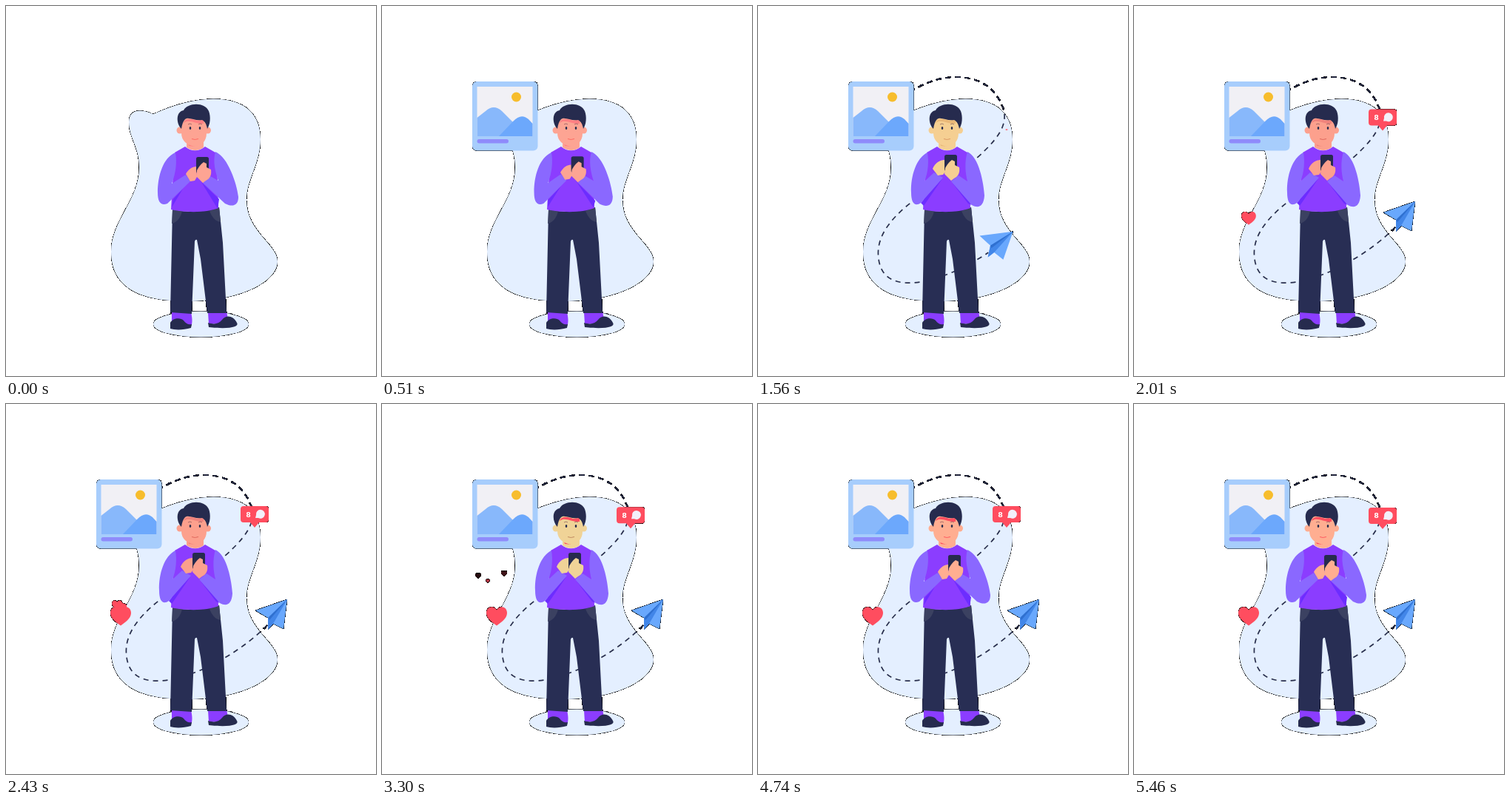
Recreate the animation shown at these times as an HTML page. Size 500 px wide and 500 px high, loop 5490 ms.

```html
<!DOCTYPE html>
<html lang="en">
<head>
<meta charset="utf-8">
<title>Sharing a picture</title>
<style>
  html, body { margin: 0; width: 100%; height: 100%; overflow: hidden; background: #fff; }
  svg { display: block; width: 100vw; height: 100vh; }
  text { font: bold 9.5px "DejaVu Sans", "Open Sans", sans-serif; }
  .skin { fill: var(--skin); }
  .shade { fill: var(--shade); }
</style>
</head>
<body>
<svg viewBox="0 0 500 500">
  <defs>
    <!-- Hard dark rim under every soft outer edge -->
    <filter id="rim" filterUnits="userSpaceOnUse" x="0" y="0" width="500" height="500" color-interpolation-filters="sRGB">
      <feComponentTransfer in="SourceAlpha" result="edge"><feFuncA type="linear" slope="255"/></feComponentTransfer>
      <feMerge><feMergeNode in="edge"/><feMergeNode in="SourceGraphic"/></feMerge>
    </filter>
    <path id="heart" d="M0 13 C-5 9-14 4-14-4 C-14-13-4-15 0-8 C4-15 14-13 14-4 C14 4 5 9 0 13Z" fill="#ff4d5f"/>
    <mask id="reveal" maskUnits="userSpaceOnUse" x="0" y="0" width="500" height="500">
      <path id="trace" fill="none" stroke="#fff" stroke-width="8"/>
    </mask>
  </defs>

  <g filter="url(#rim)">
    <g fill="#e4efff">
      <path d="M199 146 C225 134 255 125.500 280 125.500 C325 125.500 344 148 344 180 C344 212 325 235 325 262 C325 305 367 322 367 345 C367 372 318 399 244 399 C180 399 142 380 142 332 C142 290 180 262 180 218 C180 190 166 178 166 157 C166 142 178 137 199 146Z"/>
      <ellipse cx="263.500" cy="430" rx="64.500" ry="17.500"/>
    </g>

    <g mask="url(#reveal)">
      <path id="route" d="M209 114 C252 87 300 92 320 118 C345 150 333 172 295 206 C270 228 240 240 210 263 C175 290 159 315 163 342 C167 372 192 377 220 373 C270 364 325 328 353 299" fill="none" stroke="#282e4c" stroke-width="1.700" stroke-dasharray="7 6" stroke-dashoffset="4"/>
    </g>

    <g id="picture">
      <rect x="122" y="102" width="88.500" height="93.500" rx="6" fill="#a7cdfc"/>
      <path d="M128.500 109H203.500V176H128.500Z" fill="#f1f0f5"/>
      <circle cx="181.500" cy="123" r="6.500" fill="var(--sun)"/>
      <path d="M128.500 151 L140 142 Q151 132 162 142 L185 165 L190 176 H128.500Z" fill="#88b8fb"/>
      <path d="M158 176 L177 156 Q188 144 198 153 L203.500 159 V176Z" fill="#6ca8fc"/>
      <rect x="128.500" y="180" width="42.500" height="5.500" rx="2.700" fill="#8f8bfb"/>
    </g>

    <g id="man">
      <path d="M224 413 L250 414 C252 422 252 429 250 433 L224 431Z M273 414 L298 413 L301 428 L274 430Z" fill="#8b3dff"/>
      <path d="M222 428 C226 421 236 421 240 425 C243 429 246 431 251 430 L250 435 C240 438 228 438 222 436Z M273 428 C282 431 288 429 292 424 C297 417 307 418 312 428 C316 434 300 437 274 434Z" fill="#262b4e"/>
      <path d="M225 275 C240 279 270 279 288 272 L293 320 L298 415 L272 415 L263 342 L258 316 Q256 315 255 318 L251 416 L222 414Z" fill="#282e54"/>
      <path d="M225 275 L238 277 C236 287 230 293 224 294Z M275 277 L288 272 L290 292 C282 291 278 284 275 277Z" fill="#3b4161"/>

      <path class="skin" d="M244 180 H267 V191 Q256 199 244 191Z"/>
      <path class="shade" d="M245 183 Q250 190 256 190 L247 189Z"/>
      <path d="M242 190 C250 197 261 197 269 190 L283 198 L286 235 L287 273 C270 280 240 279 223 275 L225 240 L228 198Z" fill="#8b3dff"/>
      <path id="folds" fill="#6c2dff"/>
      <path id="leftArm" fill="#8a68ff"/>
      <path id="rightArm" fill="#8a68ff"/>
      <path id="leftHand" class="skin"/>
      <g id="hold">
        <rect x="257" y="204" width="17" height="22" rx="2.500" fill="#262b4e"/>
        <path class="skin" d="M258 222 C260 218 264 213 267 211 L271 213 L271 218 L277 221 C278 228 276 233 270 236 L266 239 L257 230Z"/>
      </g>

      <circle class="skin" cx="235" cy="168" r="4.500"/>
      <circle class="skin" cx="272.500" cy="168" r="4.500"/>
      <path class="skin" d="M237 150 H271 V172 C271 183 264 189 255 189 C245 189 237 182 237 172Z"/>
      <path class="shade" d="M240 158 C242 151 251 152 258 155 L267 154 V159 C256 160 248 152 240 158Z"/>
      <path d="M237 166 C230 159 229 143 240 141 C245 131 268 129 274 142 C277 150 276 160 272 166 C271 160 269 156 265 154 C256 156 247 149 242 153 C239 156 238 160 237 166Z" fill="#262b4e"/>
      <g fill="#262b4e">
        <ellipse cx="249" cy="165" rx="1.300" ry="2"/>
        <ellipse cx="262" cy="165" rx="1.300" ry="2"/>
      </g>
      <path d="M246 160 Q249 158 251 160 M260 160 Q262 158 265 160" fill="none" stroke="#6b4650" stroke-width=".6"/>
      <path d="M251 179.500 Q255 181.500 260 179.500" fill="none" stroke="var(--mouth)"/>
    </g>

    <g id="plane">
      <path d="M27 -35 L-16 -20 L1 -10 L1 6 L8 -2 L22 5Z" fill="#69a8fd"/>
      <path d="M27 -35 L1 -10 L1 6 L8 -2Z" fill="#4286e8"/>
      <path d="M27 -35 L1 -10 L3 -7Z" fill="#2f70d0"/>
    </g>

    <g id="bubble">
      <path d="M-15 -29 H15 Q19 -29 19 -25 V-11 Q19 -7 15 -7 H6 L0 0 L-6 -7 H-15 Q-19 -7 -19 -11 V-25 Q-19 -29 -15 -29Z" fill="#ff4d5f"/>
      <text x="-8.500" y="-14.500" text-anchor="middle" fill="#fff">8</text>
      <path d="M1 -13 L2 -17 A6 6 0 1 1 5 -13Z" fill="#f3f0fa"/>
    </g>

    <g id="sparks"></g>
    <use id="like" href="#heart"/>
  </g>
</svg>

<script>
const LOOP = 5490, STEP = 30;
const el = id => document.getElementById(id);
const set = (node, attr, value) => node.setAttribute(attr, value);
const span = (t, from, to) => Math.min(1, Math.max(0, (t - from) / (to - from)));
const smooth = p => (1 - Math.cos(Math.PI * p)) / 2;
const easeOut = p => 1 - (1 - p) ** 3;
const mix = (a, b, k) => a + (b - a) * k;

const route = el('route'), trace = el('trace');
const routeLength = route.getTotalLength();
set(trace, 'd', route.getAttribute('d'));
set(trace, 'stroke-dasharray', `${routeLength} ${routeLength + 20}`);

// Each part has two poses with the same path structure.
const poses = {
  leftArm: [
    'M229 198 C212 205 205 230 205 252 C205 266 210 270 218 267 L249 237 L243 228 L224 240 C230 225 231 210 229 198Z',
    'M229 198 C214 205 206 230 207 252 C207 268 213 271 220 266 L250 232 L238 225 L225 237 C230 225 231 210 229 198Z'],
  rightArm: [
    'M283 197 C300 204 312 240 314 258 C314 270 306 272 296 267 L266 239 L276 230 L287 236 C283 225 279 210 283 197Z',
    'M283 197 C299 204 305 240 306 256 C305 271 298 274 289 269 L261 237 L271 229 L283 237 C280 225 279 210 283 197Z'],
  leftHand: [
    'M243 227 C246 221 252 217 257 217 L258 231 L255 236 L249 237Z',
    'M236 220 C239 212 246 208 252 208 L253 224 L250 228 L243 229Z'],
  folds: [
    'M224 272 L226 261 L239 247Z M264 238 L288 261 L286 274Z',
    'M224 270 L220 266 L250 232Z M261 237 L289 269 L284 267Z']
};
const blend = ([a, b], k) => {
  const target = b.match(/\d+/g);
  let i = 0;
  return a.replace(/\d+/g, n => mix(+n, +target[i++], k).toFixed(2));
};

// Start time, skin, shade, mouth, sun
const tones = [
  [0, '#fda493', '#ff7f83', '#ff6b62', '#f7bd2d'],
  [570, '#9ba3b0', '#7f8797', '#51597a', '#b7c2d0'],
  [1200, '#f5cf92', '#e9b878', '#dc9a66', '#f7bd2d'],
  [2000, '#fca08d', '#f0837c', '#e0685c', '#f7bd2d'],
  [2880, '#f0d397', '#ff4d5f', '#c08a60', '#f7bd2d'],
  [3720, '#ffae91', '#ff4d5f', '#ff5a60', '#f7bd2d']
];
const toneNames = ['--skin', '--shade', '--mouth', '--sun'];

// End x, end y, end scale, end opacity
const sparks = [[130, 232, .28, .15], [143, 239, .18, .7], [165, 229, .28, .25]].map(end => {
  const node = document.createElementNS('http://www.w3.org/2000/svg', 'use');
  set(node, 'href', '#heart');
  el('sparks').append(node);
  return { node, end };
});

function place(id, x, y, scale, angle = 0) {
  const node = el(id);
  set(node, 'transform', `translate(${x} ${y}) rotate(${angle}) scale(${scale})`);
  set(node, 'visibility', scale > 0 ? 'visible' : 'hidden');
}

function headingAt(distance) {
  const a = route.getPointAtLength(Math.max(0, distance - 1));
  const b = route.getPointAtLength(Math.min(routeLength, distance + 1));
  return Math.atan2(b.y - a.y, b.x - a.x) * 180 / Math.PI;
}
const finalHeading = headingAt(routeLength);

function drawMan(t) {
  const k = smooth(span(t, 300, 900)) - smooth(span(t, 3600, 4300));
  for (const id in poses) set(el(id), 'd', blend(poses[id], k));
  set(el('hold'), 'transform', `translate(${-5 * k} ${-3 * k})`);
  const tone = tones.filter(row => row[0] <= t).pop();
  toneNames.forEach((name, i) => document.documentElement.style.setProperty(name, tone[i + 1]));
}

function drawPlane(t) {
  const distance = routeLength * smooth(span(t, 600, 1780));
  const at = route.getPointAtLength(distance);
  set(trace, 'stroke-dashoffset', routeLength - distance);
  set(trace, 'visibility', distance > 0 ? 'visible' : 'hidden');
  place('plane', at.x, at.y, span(t, 600, 1470), headingAt(distance) - finalHeading);
}

function drawLikes(t) {
  const bob = Math.sin((t - 2130) / 1200 * Math.PI * 2);
  place('bubble', 336, 168 - bob, easeOut(span(t, 1550, 1980)));
  place('like', 155, 286.5, easeOut(span(t, 1890, 2250)));
  sparks.forEach(({ node, end: [x, y, size, alpha] }, i) => {
    const rise = span(t, 2220 + i * 60, 3300);
    const fade = span(t, 2700, 3300);
    set(node, 'transform', `translate(${mix(155, x, rise)} ${mix(281, y, rise)}) scale(${mix(.55, size, rise)})`);
    set(node, 'opacity', mix(1, alpha, fade) * (1 - span(t, 3300, 3390)));
    set(node, 'visibility', rise > 0 && t < 3390 ? 'visible' : 'hidden');
  });
}

function draw(now) {
  const t = Math.floor(now % LOOP / STEP) * STEP;
  const grow = easeOut(span(t, 60, 540));
  place('picture', 166 * (1 - grow), 149 * (1 - grow), grow);
  drawMan(t);
  drawPlane(t);
  drawLikes(t);
}

const start = performance.now();
function tick() {
  draw(performance.now() - start);
  requestAnimationFrame(tick);
}
tick();
</script>
</body>
</html>
```
